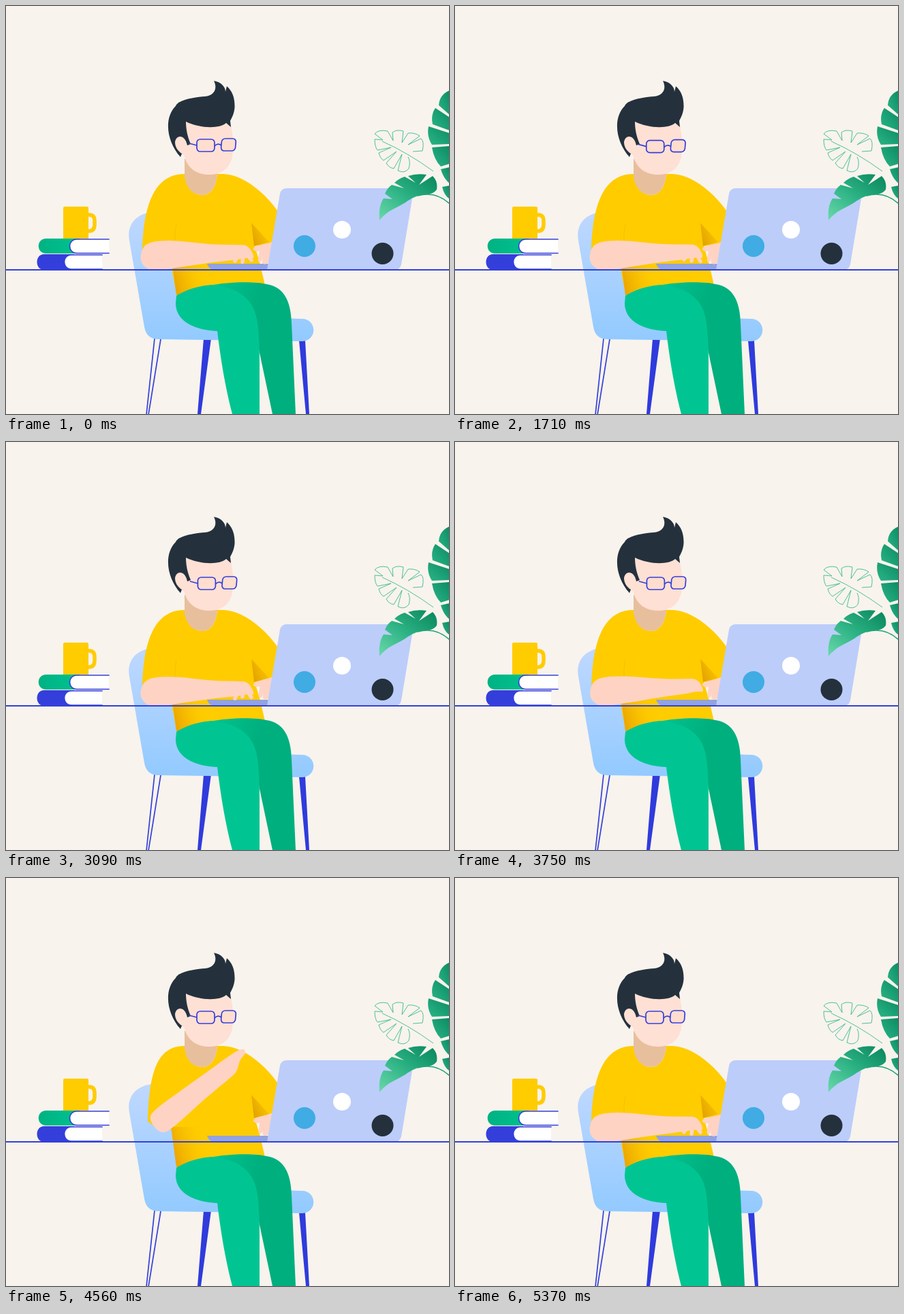
Write an HTML page that moves like this. It is 650x600 px and loops after 5400 ms.

```html
<!DOCTYPE html>
<html lang="en">
<head>
<meta charset="utf-8">
<title>Working at the desk</title>
<style>
html, body { margin: 0; width: 100%; height: 100%; overflow: hidden; background: #f8f3ed; }
svg { display: block; width: 650px; height: 600px; }
.ink { fill: none; stroke: #343fdb; stroke-width: 1.7; stroke-linecap: round; }
.skin { fill: #ffd3c3; }
</style>
</head>
<body>
<svg viewBox="0 0 650 600">
  <defs>
    <linearGradient id="chair" x2="0" y2="1"><stop stop-color="#bfd8ff"/><stop offset="1" stop-color="#92caff"/></linearGradient>
    <linearGradient id="thigh" gradientUnits="userSpaceOnUse" x1="300" y1="410" x2="372" y2="432"><stop stop-color="#00c48f"/><stop offset="1" stop-color="#00af7e"/></linearGradient>
    <linearGradient id="fold" gradientUnits="userSpaceOnUse" x1="244" y1="406" x2="297" y2="390"><stop stop-color="#e9a300"/><stop offset="1" stop-color="#fc0" stop-opacity="0"/></linearGradient>
    <linearGradient id="cuff" gradientUnits="userSpaceOnUse" x1="361" y1="340" x2="386" y2="328"><stop stop-color="#e5a400"/><stop offset="1" stop-color="#fc0"/></linearGradient>
    <linearGradient id="leaf" x1="0" y1="1" x2="1" y2="0"><stop stop-color="#6ad9aa"/><stop offset=".5" stop-color="#2bb183"/><stop offset="1" stop-color="#08865b"/></linearGradient>
    <linearGradient id="lobe" x1="0" y1="1" x2="1" y2="0"><stop stop-color="#2ab687"/><stop offset="1" stop-color="#0c8a62"/></linearGradient>
    <linearGradient id="book"><stop stop-color="#00b283"/><stop offset="1" stop-color="#00c28f"/></linearGradient>
  </defs>

  <!-- chair -->
  <path class="ink" d="M218 489L206 601M227 490L209 601"/>
  <path fill="#2f3bdc" d="M290 489H301L286 600H281ZM430 492H439L445 600H440Z"/>
  <path fill="url(#chair)" d="M214 303C190 306 177 322 181 345L203 472Q206 489 222 490L434 493C457 493 457 460 434 460L400 459L250 400L240 310Z"/>

  <!-- body -->
  <path id="shirt" fill="#fc0"/>
  <path fill="url(#fold)" d="M242 366H300L306 425H250Z"/>
  <path fill="url(#cuff)" d="M360 319L386 347L364 353Z"/>
  <path id="seam" d="M250 320Q247 334 248 348" fill="none" stroke="#f2b600" opacity=".6"/>
  <path fill="url(#thigh)" d="M298 411C330 405 365 405 382 409C408 413 418 434 419 466L425 600H391L371 505Z"/>
  <path fill="#00c592" d="M250 426C266 416 286 411 303 410C338 414 362 428 368 460C371 478 372 500 372 530V600H332C322 562 315 520 310 478C270 476 249 460 249 437Z"/>

  <!-- head -->
  <path fill="#e8bf9d" d="M262 225V251Q266 277 288 278Q307 277 310 247V225Z"/>
  <path fill="#ffe0d4" d="M262 168L330 174Q335 198 332 222C328 240 315 248 298 248C280 248 266 239 261 219C251 217 247 206 248 199C250 189 262 187 266 200Z"/>
  <path fill="#24313d" d="M256 222C236 200 231 165 249 147C253 137 280 134 292 133C305 132 311 122 305 110C316 112 322 119 322 126L324 118C332 125 336 135 335.500 149C335 158 331 165 329 169L330 178L323 172C313 181 284 180 264 170C264 180 266 192 271 203L266 205C263 189 250 188 248 200C248 208 253 214 258 217Z"/>
  <g id="glasses" class="ink">
    <path d="M269 202L280 205M306 206Q311 201 316 205"/>
    <rect x="280" y="196" width="26" height="18" rx="5" fill="#ffddcf"/>
    <rect x="316" y="195" width="21" height="18" rx="5" fill="#ffddcf" transform="translate(17.800) skewX(-5)"/>
  </g>

  <!-- laptop and hands -->
  <path fill="#92a3dd" d="M295 379H386V388H304Q297 386 295 379Z"/>
  <path id="rightHand" class="skin" d="M392 346C375 352 362 352 363 358Q366 362 372 360L370 374Q372 380 376 373L377 365L376 377Q380 382 386 376Z"/>
  <g id="arm" class="skin">
    <path id="forearm"/>
    <path id="fingers" fill="none" stroke="#ffd3c3" stroke-width="5.500" stroke-linecap="round"/>
  </g>
  <path fill="#bccdfa" d="M412 268H590Q599 268 597 277L580 380Q578 388 570 388H383L402 276Q404 268 412 268Z"/>
  <circle cx="438" cy="353" r="16" fill="#40ace3"/>
  <circle cx="493" cy="329" r="13" fill="#fff"/>
  <circle cx="552.500" cy="364" r="16" fill="#24313d"/>

  <!-- plant -->
  <g fill="none" stroke="#3dba8b">
    <path stroke-width=".9" d="M552 199Q590 216 627 243M597 214L611 213Q614 199 609 195L590 204L607 191Q600 186 590 187L581 201L583 184Q573 181 567 186L568 198L560 184Q547 181 541 188L553 197L541 196Q541 207 545 212L565 208L547 216Q549 224 554 227L573 214L558 231Q562 238 569 239L581 218L575 242Q585 247 591 239Q594 229 590 222"/>
    <path d="M604 279Q631 272 651 291" stroke="#14a276" stroke-width="1.500"/>
  </g>
  <path fill="url(#leaf)" d="M548 315C547 300 549 290 554 283L567 284L556 276Q559 268 566 263L584 268L570 260Q577 253 585 251L601 260L590 250Q602 246 617 248L606 263L626 250Q634 258 632 270Q626 278 614 277C602 279 594 283 586 289C572 298 560 300 548 315Z"/>
  <g fill="url(#lobe)">
    <path d="M651 124Q636 130 635 146L651 160Z"/>
    <path d="M651 164L630 150Q623 160 626 174L651 183Z"/>
    <path d="M651 187L620 177Q617 192 625 204L651 203Z"/>
    <path d="M651 206L625 208Q628 226 638 236L651 232Z"/>
    <path d="M651 237L638 240Q642 254 651 261Z"/>
    <path d="M651 264L640 266Q643 279 651 284Z"/>
  </g>

  <!-- books, mug and desk -->
  <path fill="#fc0" d="M86 295H119Q121 295 121 297V342H84V297Q84 295 86 295Z"/>
  <path fill="none" stroke="#fc0" stroke-width="5.500" d="M120 307H122Q130 307 130 316V321Q130 331 122 331H120"/>
  <path fill="url(#book)" d="M59 342H108V364H59C44 364 44 342 59 342Z"/>
  <path fill="#fff" d="M151 343H104C90 343 90 363.500 104 363.500H151Z"/>
  <path class="ink" d="M151 343H104C90 343 90 363.500 104 363.500H151"/>
  <path fill="#343fdb" d="M56 365H100V388H56C42 388 42 365 56 365Z"/>
  <path fill="#fff" d="M141 366H96C82 366 82 387 96 387H141Z"/>
  <path class="ink" d="M141 366H96C82 366 82 387 96 387H141"/>
  <path stroke="#343fdb" stroke-width="1.800" d="M0 388H650"/>
</svg>
<script>
const $ = id => document.getElementById(id);
const mix = (a, b, k) => a + (b - a) * k;
const ramp = (t, from, to) => Math.min(1, Math.max(0, (t - from) / (to - from)));
const ease = (t, from, to) => { const k = ramp(t, from, to); return k * k * (3 - 2 * k); };

// Forearm outlines, measured from the elbow along the arm
const typing = [[-24,-6],[-14,-19],[22,-22],[80,-15],[118,-15],[134,-14],[144,6],[132,4],[118,7],[80,11],[22,20],[-10,24],[-25,12]];
const pointing = [[-18,-14],[0,-18],[50,-14],[104,-10],[124,-9],[156,-5],[155,5],[141,6],[127,17],[112,18],[63,17],[11,20],[-19,18]];

function blob(points) {
  const mid = i => {
    const a = points[i], b = points[(i + 1) % points.length];
    return `${(a[0] + b[0]) / 2} ${(a[1] + b[1]) / 2}`;
  };
  return `M${mid(points.length - 1)}` + points.map((p, i) => `Q${p[0]} ${p[1]} ${mid(i)}`).join('') + 'Z';
}

function draw(now) {
  const t = now % 5400;
  const lift = ease(t, 3720, 4000) - ease(t, 4560, 4860);
  const push = ease(t, 3990, 4230) - ease(t, 4310, 4560);
  const slide = ease(t, 600, 2700) - ease(t, 4110, 4230);
  const curl = 1 - ramp(t, 3660, 3750) + ramp(t, 4830, 4920);
  const beat = t / 300 * 2 * Math.PI;
  const tap = phase => Math.sin(beat + phase) * 1.6;

  const x = mix(200, 208, lift) - 6 * push, y = 358 - 14 * push;
  $('shirt').setAttribute('d', `M262 247C222 247 ${x + 2} 284 ${x} ${y}L${x + 14} ${y + 10}L243 ${mix(386, 370, lift)}L251 428H384L373 380L365 353L390 350L399 302C376 270 346 248 318 247H310Q307 277 288 278Q266 277 262 247Z`);
  $('seam').setAttribute('opacity', .6 * (1 - lift));
  $('glasses').setAttribute('transform', `translate(${1.4 * slide} ${3 * slide})`);

  const angle = -40 * lift - 8 * push + tap(0) * .2 * curl;
  $('arm').setAttribute('transform', `translate(${mix(222, 231, lift) - 6 * push} ${mix(366, 353, lift) - 18 * push}) rotate(${angle})`);
  $('forearm').setAttribute('d', blob(typing.map((p, i) => p.map((v, j) => mix(v, pointing[i][j], lift)))));
  $('fingers').setAttribute('d', [[120, 114], [127, 125], [131, 138]].map(([from, to], i) =>
    `M${from} -2L${mix(from, to, curl)} ${mix(-1, 9 + tap(i * 2.1), curl)}`).join(''));
  $('rightHand').setAttribute('transform', `translate(0 ${tap(2.5) * .6}) rotate(${tap(2.5)} 388 352)`);
  requestAnimationFrame(() => draw(performance.now()));
}
draw(0);
</script>
</body>
</html>
```
